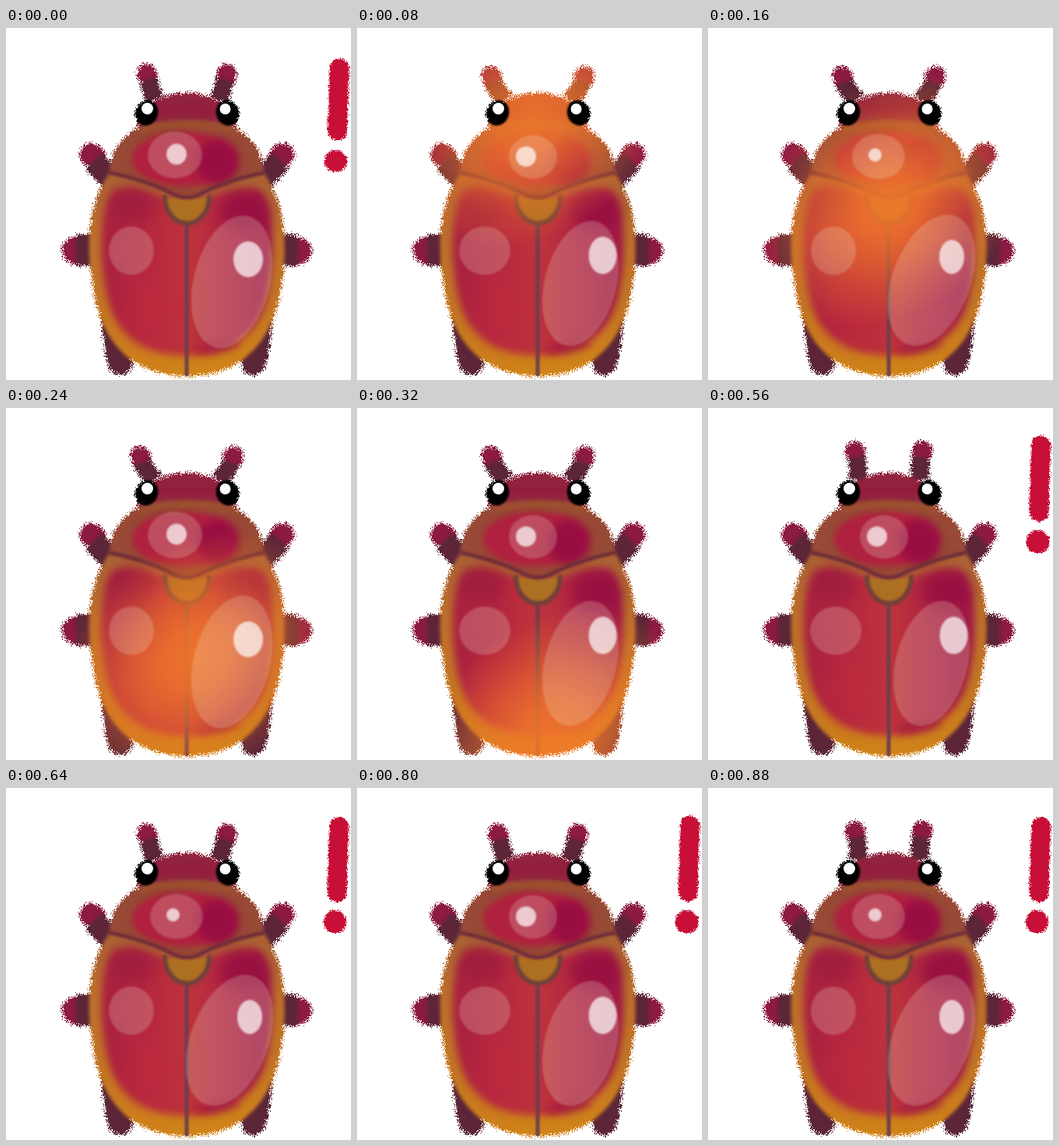
These frames come from a looping animation (443 by 452 pixels, 0.96 s). An HTML page with a canvas:

```html
<!DOCTYPE html>
<html>
<head>
<meta charset="utf-8">
<style>
html, body { margin: 0; width: 100%; height: 100%; overflow: hidden; background: #fff; }
canvas { display: block; }
</style>
</head>
<body>
<canvas id="stage" width="443" height="452"></canvas>
<script>
const W = 443, H = 452, STEP = 80, STEPS = 12, AXIS = 232.3;
const ctx = document.getElementById('stage').getContext('2d', { willReadFrequently: true });

// Shine poses cycle every three steps: [x, y, rx, ry, tilt] and the "!" strokes.
const POSES = [
  { neck: [217, 163, 35, 30], neckDot: [219, 162, 13, 13.5], left: [161, 286, 29, 31],
    right: [290, 326, 49, 87, .25], rightDot: [311, 297, 19, 23],
    bar: [428, 52, 425.5, 132], dot: [423.5, 171, 14.5, 14] },
  { neck: [226, 165.5, 31, 28], neckDot: [217, 165, 13, 13], left: [164, 286, 33, 31],
    right: [287, 328, 46, 82, .25], rightDot: [315.5, 292, 18, 24],
    bar: [427.5, 48, 425, 133], dot: [423.5, 172, 15, 15] },
  { neck: [219, 165, 34, 29], neckDot: [214.5, 163, 8.5, 8.5], left: [161, 286, 29, 31],
    right: [287, 324, 50, 88, .36], rightDot: [313, 294, 16, 22],
    bar: [427.5, 50, 425, 134], dot: [422.5, 172, 14.5, 15] }
];
const FEELERS = { wide: [172.5, 62], mid: [181, 58.5], narrow: [189, 55] };

const SHELL = 'M136 182C108 218 102 268 110 322C117 392 153 447 232 447C311 447 348 392 355 322C362 268 356 218 328 182Z';
const FIELD = 'M137 210C118 240 120 300 130 345C141 395 178 419 232 421C287 419 324 395 335 345C345 300 347 240 328 210C310 200 280 212 232 224C184 212 155 200 137 210Z';
const NECK = 'M133 185C133 152 160 124 198 121Q232 116 267 121C304 124 331 152 331 185Q282 197 250 213Q232 222 214 213Q182 197 133 185Z';
const HEAD = 'M168 128C171 101 197 84 232 83C267 84 293 101 296 128Z';

let seed = 7;
const noise = Float32Array.from({ length: W * H }, () => {
  seed = (Math.imul(seed, 1664525) + 1013904223) >>> 0;
  return 6 + 240 * seed / 2 ** 32;
});

const soften = px => { ctx.filter = px ? `blur(${px}px)` : 'none'; };

function shape(path, color, blur = 2) {
  soften(blur);
  ctx.fillStyle = color;
  ctx.fill(new Path2D(path));
}

function oval([x, y, rx, ry, tilt = 0], color, blur = .8) {
  soften(blur);
  ctx.fillStyle = color;
  ctx.beginPath();
  ctx.ellipse(x, y, rx, ry, tilt, 0, 7);
  ctx.fill();
}

function stroke(path, color, width, blur = 2, cap = 'round') {
  soften(blur);
  ctx.lineCap = cap;
  ctx.lineJoin = 'round';
  ctx.strokeStyle = color;
  ctx.lineWidth = width;
  ctx.stroke(new Path2D(path));
}

function gradient(x0, y0, x1, y1, ...colors) {
  const g = ctx.createLinearGradient(x0, y0, x1, y1);
  colors.forEach((c, i) => g.addColorStop(i / (colors.length - 1), c));
  return g;
}

function bothSides(draw) {
  draw();
  ctx.save();
  ctx.translate(2 * AXIS, 0);
  ctx.scale(-1, 1);
  draw();
  ctx.restore();
}

function limbs([x, y]) {
  const dark = '#5c2638', tip = '#8c1a42';
  bothSides(() => {
    stroke(`M${x} ${y}l.5 2`, tip, 25);
    stroke('M109.5 163l3 2', tip, 30);
    stroke('M89 286h6', tip, 34);
    stroke(`M${x + 2} ${y + 8}Q${x + 5} 77 191 93`, dark, 23, 2, 'butt');
    stroke('M112 171L142 200', dark, 30, 2, 'butt');
    stroke('M90 285H125', dark, 40, 2, 'butt');
    stroke('M139 375Q140 410 147 430', dark, 31);
  });
}

function body() {
  shape(HEAD, gradient(0, 83, 0, 128, '#8f2840', '#941c3e', '#8e3040'));
  shape(SHELL, gradient(0, 180, 0, 447, '#a96135', '#bd702b', '#c37524', '#d18418'));

  shape(FIELD, gradient(122, 0, 345, 0, '#a92141', '#b4263f', '#be343b', '#ae2344', '#9c1747'), 5);
  oval([162, 226, 30, 24], '#98193f99', 9);
  oval([306, 235, 32, 25], '#950d40cc', 9);
  oval([190, 360, 38, 48], '#c02c3c88', 14);
  oval([272, 410, 30, 8, -.2], '#a0183f99', 5);

  shape(NECK, gradient(133, 0, 331, 0, '#994c38', '#974333', '#9a4936', '#974b36'));
  stroke('M176 130Q232 118 289 130', '#9c502f', 9, 2.5);
  oval([229, 168, 67, 35], '#b0203f', 3.5);
  oval([272, 172, 27, 29], '#990d42', 6);

  const scutellum = 'M204 217A28.5 34 0 0 0 261 217';
  shape(scutellum + 'L232 220Z', '#ad6f22', 1);
  stroke(scutellum, '#704038', 6, 1.5);
  stroke('M134 186Q182 196 214 213Q232 222 250 213Q282 196 330 186', '#702d38', 5, 1.5);
  stroke('M232 254V445', '#6e3f4c', 5, 1);
}

// A slanted patch of warm light that slides down the back.
function glow(step) {
  const g = ctx.createRadialGradient(0, 0, 0, 0, 0, 1);
  [.9, .8, .56, .25, 0].forEach((a, i) => g.addColorStop(i / 4, `rgba(243,122,43,${a})`));
  soften(0);
  ctx.save();
  ctx.globalCompositeOperation = 'source-atop';
  ctx.translate(215 + 10 * step, 20 + 100 * step);
  ctx.rotate(-.65);
  ctx.scale(190, 145);
  ctx.fillStyle = g;
  ctx.fillRect(-1, -1, 2, 2);
  ctx.restore();
}

function shines(pose) {
  [pose.left, pose.right, pose.neck].forEach(o => oval(o, 'rgba(242,235,212,.22)', 1.2));
  [pose.neckDot, pose.rightDot].forEach(o => oval(o, 'rgba(255,255,255,.7)'));
}

function eyes() {
  oval([180.5, 109, 14.5, 16.5, .4], '#000', 1.2);
  oval([284.5, 109, 14.5, 16.5, -.4], '#000', 1.2);
  oval([181.5, 103.5, 7.5, 7.5], '#fff', .6);
  oval([281.5, 104, 7, 7], '#fff', .6);
}

function exclaim({ bar: [x0, y0, x1, y1], dot }) {
  stroke(`M${x0} ${y0}L${x1} ${y1}`, '#c80f37', 25, 1.3);
  oval(dot, '#c80f37', 1.3);
}

// Turns soft edges into grain.
function dissolve() {
  const image = ctx.getImageData(0, 0, W, H), d = image.data;
  for (let i = 0; i < noise.length; i++) d[4 * i + 3] = d[4 * i + 3] > noise[i] ? 255 : 0;
  ctx.putImageData(image, 0, 0);
}

function draw(step) {
  const pose = POSES[step % 3], alert = step === 0 || step > 6;
  const feelers = !alert ? 'wide' : step % 2 ? 'narrow' : 'mid';
  ctx.clearRect(0, 0, W, H);
  limbs(FEELERS[feelers]);
  body();
  if (step >= 1 && step <= 4) glow(step);
  shines(pose);
  eyes();
  if (alert) exclaim(pose);
  dissolve();
}

let shown = -1;
function tick() {
  const step = Math.floor(performance.now() / STEP) % STEPS;
  if (step !== shown) draw(shown = step);
  requestAnimationFrame(tick);
}
tick();
</script>
</body>
</html>
```
